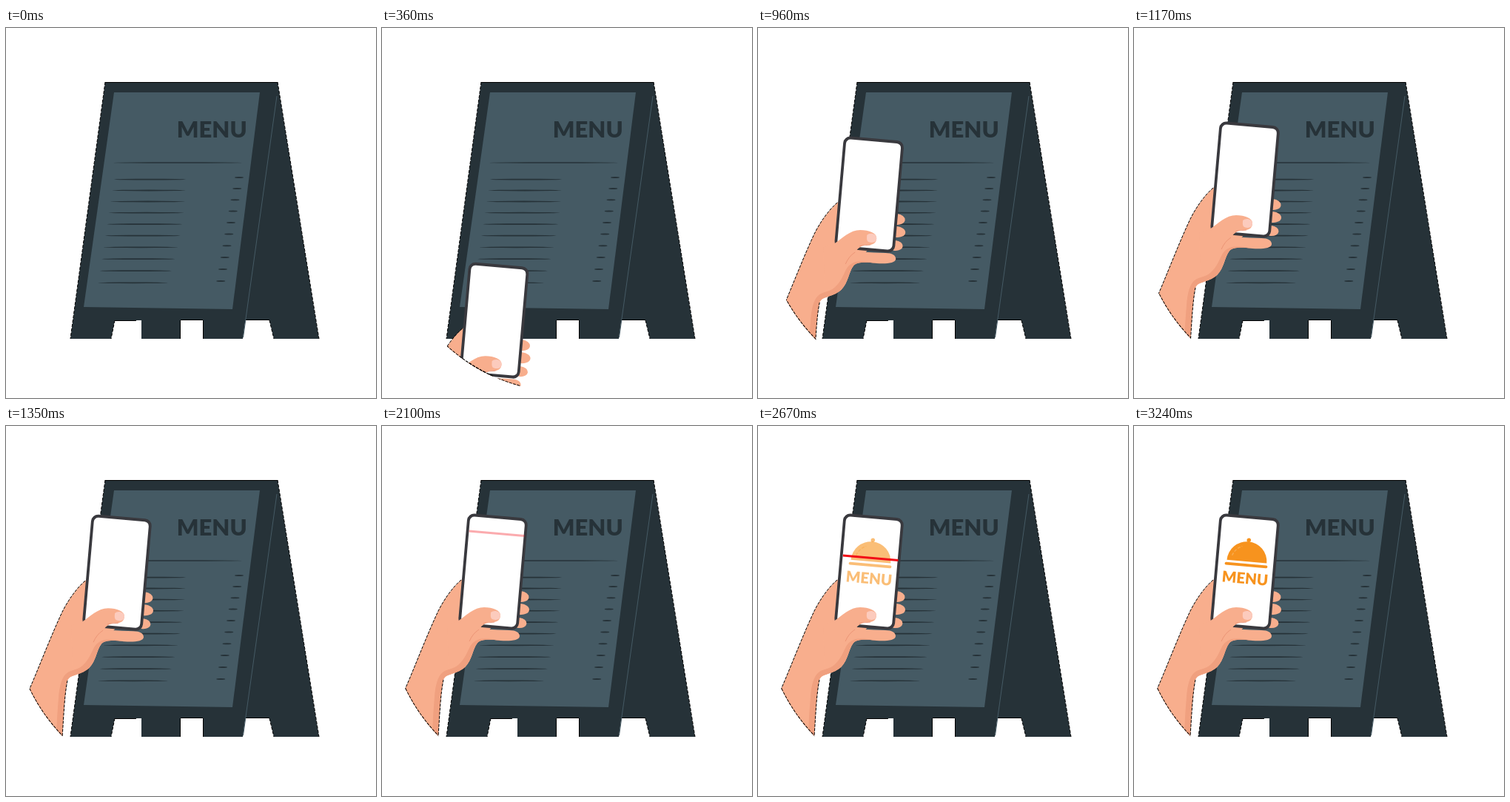
Write an HTML page with a canvas that moves like this. It is 500 by 500 pixels and loops after 3930 ms.

```html
<!DOCTYPE html>
<html lang="en">
<head>
<meta charset="utf-8">
<title>Menu board and phone</title>
<style>
  html, body { margin: 0; width: 100%; height: 100%; overflow: hidden; background: #fff; }
  canvas { display: block; width: 500px; height: 500px; }
</style>
</head>
<body>
<canvas id="stage" width="500" height="500"></canvas>
<script>
const ctx = document.getElementById('stage').getContext('2d');
const LOOP = 3930;
const DARK = '#263238', SLATE = '#455a64', CASE = '#39393e', ORANGE = '#f7931e', EDGE = '#000';
const SKIN = '#f8ae8d', SHADE = '#f0a07f', CREASE = '#e88f70', NAIL = '#fccbbd';
const TILT = 5 * Math.PI / 180;

const clamp = v => Math.min(1, Math.max(0, v));
const ramp = (t, from, to) => clamp((t - from) / (to - from));

function fill(path, color) {
  ctx.fillStyle = color;
  ctx.fill(path);
}

function stroke(path, color, width, dash = []) {
  ctx.strokeStyle = color;
  ctx.lineWidth = width;
  ctx.setLineDash(dash);
  ctx.stroke(path);
}

function ellipse(x, y, rx, ry, color, angle = 0) {
  ctx.beginPath();
  ctx.ellipse(x, y, rx, ry, angle, 0, Math.PI * 2);
  ctx.fillStyle = color;
  ctx.fill();
}

function roundRect(x, y, w, h, r, color) {
  ctx.beginPath();
  ctx.roundRect(x, y, w, h, r);
  ctx.fillStyle = color;
  ctx.fill();
}

function label(x, y, size, color) {
  ctx.font = `900 ${size}px Lato, sans-serif`;
  ctx.textAlign = 'center';
  ctx.fillStyle = color;
  ctx.fillText('MENU', x, y);
}

const boardFrame = new Path2D(`M134 73H367L423 420H362L356 395H323.5L320 420H266V395H236
  V420H183V395H147L142 420H87Z`);
const boardPanel = new Path2D('M146 87H343L306 380L105 377Z');
const boardFold = new Path2D('M366 92L320.5 418');
const boardRims = new Path2D(`M134 73.5H367M147 395.5H176M236 394.5H266M235.5 395V420
  M266.5 395V420M324 394.5H356`);
const boardSides = new Path2D('M134 73L87 420M367 73L423 420M147 395L142 420M356 395L362 420');

const arm = new Path2D(`M112 204C98 214 84 234 76 250C60 284 45 324 31 356L-20 470L70 500
  C74 460 75 435 76 419C78 390 79 362 83 343C86 334 99 337 112 326
  C122 316 122 302 129 293L150 270V204Z`);
const armEdges = new Path2D(`M107 208C96 217 84 234 76 250C60 284 45 324 31 356L-20 470
  M70 500C74 460 75 435 76 419C78 390 79 362 83 343`);
const armShade = new Path2D(`M66 500C67 440 68 400 71 366C73 342 78 332 90 329
  C108 325 113 310 119 298C125 288 134 286 150 288L160 290C145 288 134 288 129 293
  C122 302 122 316 112 326C99 337 86 334 83 343C79 362 78 390 76 419L72 500Z`);
const grip = new Path2D(`M102 264C114 256 124 245 138 245C150 245 160 249 160 256
  C160 264 152 266 146 265C138 266 134 271 131 275C145 274 160 276 172 276
  C181 276 186 279 186 284C186 290 172 291 160 290C145 288 134 288 129 293
  C122 302 122 316 112 326L90 325L88 268Z`);
const gripCreases = new Path2D(`M131 275C125 279 121 284 118 291
  M137 267C141 265 147 266 152 265`);
const nail = new Path2D('M147 252C151 248 160 250 160 256C160 262 154 263 149 261C146 259 147 255 147 252Z');
const disc = new Path2D();
disc.arc(250, 250, 242.5, 0, Math.PI * 2);

function drawBoard() {
  fill(boardFrame, DARK);
  fill(boardPanel, SLATE);
  stroke(boardFold, SLATE, 1);
  stroke(boardRims, EDGE, 1);
  stroke(boardSides, EDGE, 1, [4, 2]);
  label(278.2, 148, 31, DARK);
  ellipse(232, 182, 87, 0.8, DARK);
  for (let i = 0; i < 10; i++) {
    const left = 146 - 2.4 * i, right = 243 - 0.3 * i * i;
    ellipse((left + right) / 2, 204.6 + 14.8 * i + 0.08 * i * i, (right - left) / 2, 0.9, DARK);
    ellipse(315 - 2.75 * i, 202 + 15 * i + 0.062 * i * i, 6, 1, DARK);
  }
}

function drawCloche(alpha) {
  ctx.globalAlpha = alpha;
  ellipse(1.5, -43, 2.8, 2.8, ORANGE);
  ctx.beginPath();
  ctx.ellipse(1.2, -14, 27, 27, 0, Math.PI, 0);
  ctx.fill();
  ctx.beginPath();
  ctx.arc(1.2, -14, 21.5, Math.PI * 1.1, Math.PI * 1.38);
  ctx.strokeStyle = '#f9a94c';
  ctx.lineWidth = 1.5;
  ctx.stroke();
  roundRect(-28.3, -11, 58, 3.8, 1.9, ORANGE);
  label(0.8, 16, 20.5, ORANGE);
  ctx.globalAlpha = 1;
}

function drawScanLine(t) {
  const alpha = Math.min(ramp(t, 2070, 2160), 1 - ramp(t, 3150, 3240));
  const y = -52 + 66 * ramp(t, 2100, 3240);
  ctx.globalAlpha = alpha;
  ctx.fillStyle = '#f20d16';
  ctx.fillRect(-37, y - 1.5, 75, 3);
  ctx.globalAlpha = 1;
}

function drawPhone(t) {
  ctx.save();
  ctx.translate(150, 197);
  ctx.rotate(TILT);
  roundRect(-41, -76, 82, 152, 9.5, CASE);
  roundRect(-37.2, -72, 74.4, 144, 6, '#fff');
  drawCloche(ramp(t, 2400, 2850));
  drawScanLine(t);
  ctx.restore();
}

function drawRim(shape, dx, dy) {
  ctx.save();
  ctx.translate(dx, dy);
  ctx.clip(shape);
  ctx.translate(-dx, -dy);
  stroke(disc, EDGE, 2, [4, 1.5]);
  ctx.restore();
}

function drawHand(t) {
  const dy = 412 * Math.pow(1 - ramp(t, 0, 1530), 2.72);
  const dx = dy * 0.008;
  ctx.save();
  ctx.clip(disc);
  ctx.save();
  ctx.translate(dx, dy);

  fill(arm, SKIN);
  ellipse(187, 230.5, 11.5, 7.5, SKIN, 0.1);
  ellipse(187, 247.5, 12, 7.5, SKIN, 0.1);
  ellipse(185, 266, 10.5, 7, SKIN, 0.1);
  drawPhone(t);
  fill(grip, SKIN);
  fill(armShade, SHADE);
  stroke(gripCreases, CREASE, 0.8);
  fill(nail, NAIL);
  stroke(armEdges, EDGE, 1, [4, 1.5]);
  ctx.restore();

  drawRim(arm, dx, dy);
  drawRim(grip, dx, dy);
  ctx.restore();
}

function render(t) {
  ctx.fillStyle = '#fff';
  ctx.fillRect(0, 0, 500, 500);
  drawBoard();
  drawHand(t);
}

const start = performance.now();
function tick() {
  render((performance.now() - start) % LOOP);
  requestAnimationFrame(tick);
}
tick();
</script>
</body>
</html>
```
